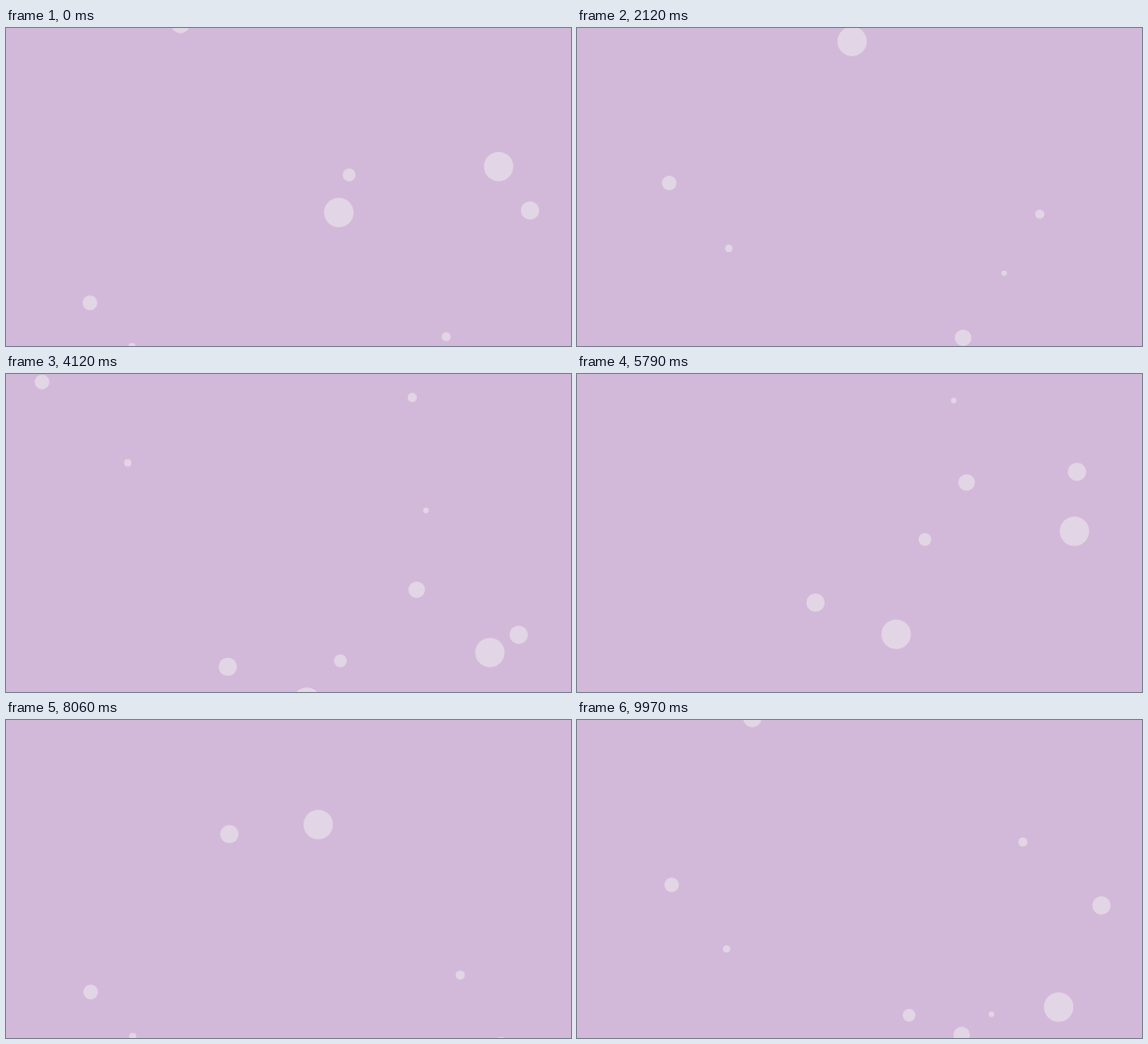
Animation, 600 px wide and 338 px high, one loop 10000 ms. Source, as an HTML page with a canvas:

```html
<!DOCTYPE html>
<html lang="en">
<head>
<meta charset="utf-8">
<title>Rising bubbles</title>
<style>
  html, body { margin: 0; width: 100%; height: 100%; overflow: hidden; background: #d3b9d9; }
  canvas { display: block; }
</style>
</head>
<body>
<canvas id="stage" width="600" height="338"></canvas>
<script>
const ctx = document.getElementById('stage').getContext('2d');
const WIDTH = 1536, HEIGHT = 864;   // layout size, scaled down to the stage
const FRAMES = 330, RATE = 33;
const START = 10.772;               // seconds already elapsed when the loop begins

const bubble = (size, left, duration) => ({ radius: size / 2, left, duration });

// Launched in rounds of four, one second apart.
const bubbles = [
  bubble(40, 0.10, 8), bubble(20, 0.20, 8), bubble(50, 0.35, 10), bubble(45, 0.65, 8),
  bubble(80, 0.50, 7), bubble(35, 0.55, 6), bubble(25, 0.75, 7), bubble(50, 0.85, 5),
  bubble(15, 0.70, 9), bubble(80, 0.80, 6)
];

// cubic-bezier(0.42, 0, 1, 1), solved by bisection
function easeIn(x) {
  let low = 0, high = 1, u = 0.5;
  for (let i = 0; i < 24; i++) {
    u = (low + high) / 2;
    const v = 1 - u;
    if (1.26 * v * v * u + 3 * v * u * u + u * u * u < x) low = u;
    else high = u;
  }
  return u * u * (3 - 2 * u);
}

const mix = (from, to, amount) => from + (to - from) * amount;

// Drift right during the first half, then back past the launch point.
function sway(phase) {
  return phase < 0.5
    ? mix(0, 100, easeIn(phase * 2))
    : mix(100, -200, easeIn(phase * 2 - 1));
}

function drawBubble({ radius, left, duration }, index, time) {
  const delay = index % 4;
  const phase = (time - delay) / duration % 1;
  const x = left * WIDTH + radius + sway(phase);
  const bottom = mix(-100, 1080, easeIn(phase));
  ctx.beginPath();
  ctx.arc(x, HEIGHT - bottom - radius, radius, 0, Math.PI * 2);
  ctx.fill();
}

function render() {
  const frame = Math.floor((performance.now() + 5) * RATE / 1000 % FRAMES);
  const time = START + frame / RATE;
  ctx.fillStyle = '#d3b9d9';
  ctx.fillRect(0, 0, WIDTH, HEIGHT);
  ctx.fillStyle = 'rgba(241, 241, 241, 0.5)';
  bubbles.forEach((item, index) => drawBubble(item, index, time));
  requestAnimationFrame(render);
}

ctx.scale(600 / WIDTH, 338 / HEIGHT);
render();
</script>
</body>
</html>
```
